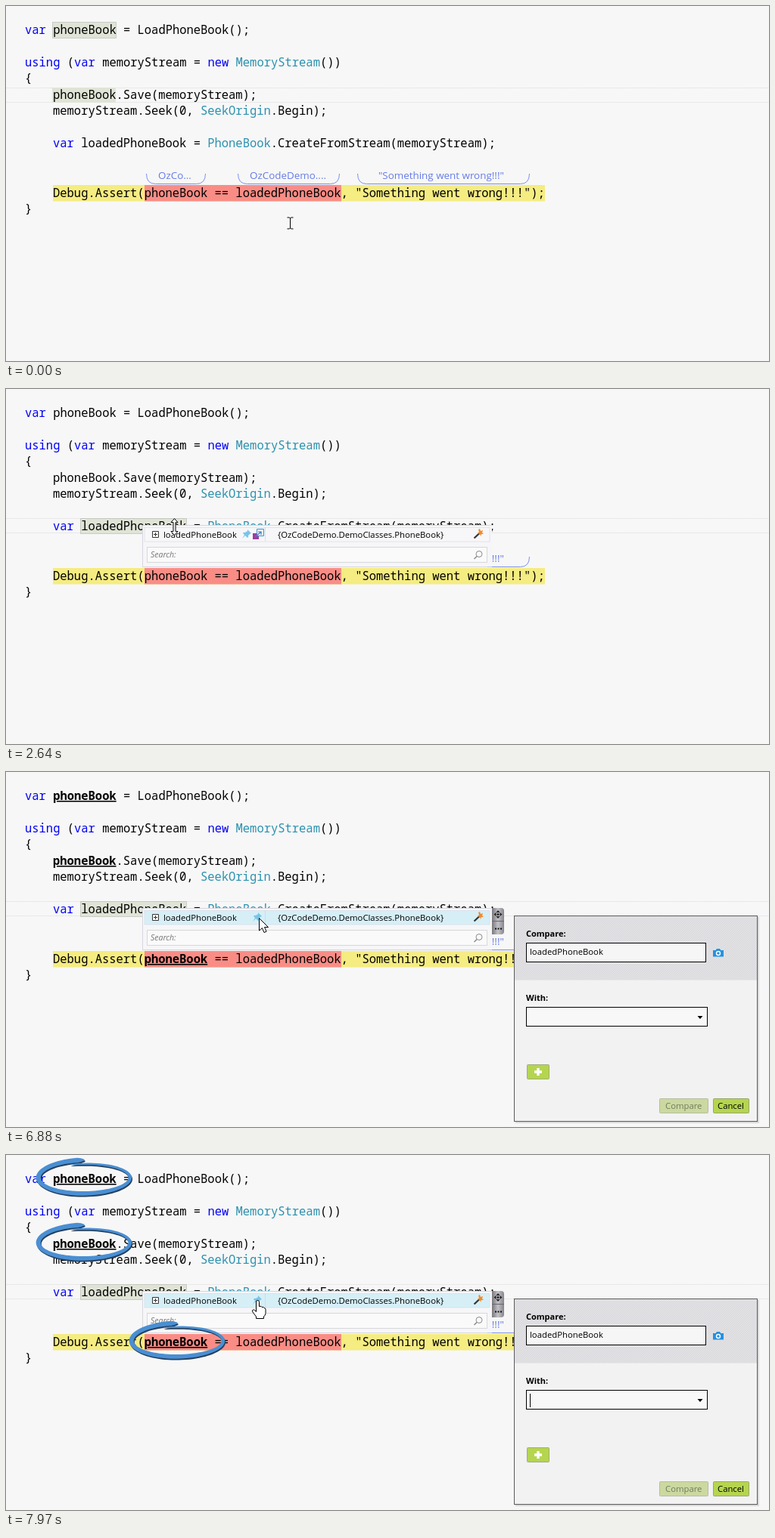
Animation, 1008 px wide and 470 px high, one loop 8000 ms. Source, as an HTML page:

```html
<!DOCTYPE html>
<html lang="en">
<head>
<meta charset="utf-8">
<title>Compare objects</title>
<style>
html, body { margin: 0; width: 100%; height: 100%; overflow: hidden; background: #f7f7f7; }
svg { display: block; width: 100%; height: 100%; }
text { white-space: pre; font: 11.3px "Open Sans", "Noto Sans", sans-serif; fill: #000; }
#code text { font: 500 15.47px "Noto Sans Mono", "DejaVu Sans Mono", monospace; }
#code .keyword { fill: #0000f5; }
#code .type { fill: #2b91af; }
#code.bold .ref { font-weight: 700; text-decoration: underline; text-decoration-thickness: 2px; }
#values text { font-size: 13.4px; fill: #667ce6; }
#values path { fill: none; stroke: #7a90f0; }
.mark { fill: #dfe4d6; }
.dotted { stroke: #a5aaa0; stroke-dasharray: 1 1; }
.label { font-weight: 700; font-size: 11px; }
</style>
</head>
<body>
<svg viewBox="0 0 1008 470" preserveAspectRatio="none">
  <defs>
    <pattern id="hatch" width="3" height="3" patternUnits="userSpaceOnUse">
      <rect width="3" height="3" fill="#e1e1e4"/>
      <path d="M0 3L3 0" stroke="#d6d6da" stroke-width=".7"/>
    </pattern>
    <linearGradient id="metal">
      <stop offset="0" stop-color="#77777c"/><stop offset=".5" stop-color="#c2c2c8"/><stop offset="1" stop-color="#85858b"/>
    </linearGradient>
  </defs>
  <rect width="1008" height="470" fill="#f7f7f7"/>
  <path id="currentLine" d="M0 .5H1008M0 19.5H1008" stroke="#dadada" stroke-dasharray="1 1"/>
  <g id="oldMarks">
    <rect class="mark dotted" x="61.5" y="21.5" width="84" height="21"/>
    <rect class="mark" x="61" y="108" width="84" height="20"/>
  </g>
  <rect id="newMark" class="mark dotted" x="98.5" y="171.5" width="140" height="20"/>
  <rect x="62" y="237" width="650" height="21.5" fill="#f5ec82"/>
  <rect x="183" y="237" width="260" height="21.5" fill="#f98d86"/>
  <g id="code"></g>
  <path id="textCaret" d="M146.5 171V191" stroke="#000"/>
  <g id="values"></g>

  <g id="popup">
    <rect x="180.5" y="180.5" width="461.5" height="55" fill="#f6f6f9"/>
    <path d="M180.5 236V180.5H641M180.5 235.5H636" fill="none" stroke="#d6d6de"/>
    <rect id="row" x="183" y="183.5" width="456" height="18.5" stroke="#d0d0d8" stroke-dasharray="1 1"/>
    <path d="M342.5 184V202" stroke="#c4c8d0" stroke-dasharray="1 1"/>
    <path d="M193.5 188.5h8v8h-8zM195 192.5h5M197.5 190v5" fill="#fff" stroke="#333"/>
    <text x="208" y="197">loadedPhoneBook</text>
    <text x="359" y="197">{OzCodeDemo.DemoClasses.PhoneBook}</text>
    <path id="pin" d="M1-6L6-1L4 0L2 2Q3 4 1 5L-2 2L-6 6L-3 1L-5-1Q-4-3-2-2L1-4Z" fill="#79c5e8"/>
    <g id="compareIcon">
      <rect x="326" y="191" width="8" height="8" fill="#a23a9e"/>
      <path d="M331.5 185.5h9v9h-9z" fill="#e6f3fb" stroke="#3f94cf"/>
      <path d="M329 196L337 189M333 189h4v4" fill="none" stroke="#3f80bd" stroke-width="1.2"/>
    </g>
    <path d="M618.5 197.5L626 190.5" stroke="#333" stroke-width="2.2"/>
    <path d="M626 185l1 3 3-1-1 3 2 2-3 0-1 3-1-3-3-1 2-2-1-3z" fill="#f28a2c"/>
    <rect x="186.5" y="209.5" width="449" height="20" fill="#fafafa" stroke="#b8b8b8" stroke-dasharray="1 1"/>
    <text x="191" y="223" style="font-style:italic;font-size:10.5px;fill:#777">Search:</text>
    <g fill="none" stroke="#888"><circle cx="625" cy="218.5" r="4"/><path d="M622 221.5L618.5 225" stroke-width="1.5"/></g>
  </g>
  <g id="tools">
    <path d="M642 180h12q4 0 4 4v27q0 4-4 4h-12z" fill="url(#metal)"/>
    <path d="M642 197.5h16" stroke="#66666b"/>
    <path d="M650 183l2.500 3h-5zM650 194l2.500-3h-5zM644.5 188.5l3-2.500v5zM655.5 188.5l-3-2.500v5z" fill="#222"/>
    <circle cx="650" cy="188.5" r="1.5" fill="#222"/>
    <path d="M646 207.5h2M649.5 207.5h2M653 207.5h2" stroke="#111" stroke-width="2"/>
  </g>

  <g id="dialog">
    <rect x="673" y="192" width="322" height="273" fill="#000" opacity=".12"/>
    <rect x="671.5" y="190.5" width="321" height="272" fill="#f2f2f2" stroke="#5c5c5c"/>
    <rect x="672" y="191" width="320" height="84.5" fill="url(#hatch)"/>
    <text class="label" x="687" y="218">Compare:</text>
    <rect x="687.5" y="226.5" width="237" height="25" fill="#f6f6f6" stroke="#000"/>
    <text x="692" y="242">loadedPhoneBook</text>
    <path d="M934 236h3.500l1.500-2h4l1.500 2h3.500v8.500h-14z" fill="#2492df"/>
    <circle cx="941" cy="240" r="2.5" fill="#2492df" stroke="#fff" stroke-width="1.4"/>
    <text class="label" x="687" y="303">With:</text>
    <rect x="687.5" y="311.5" width="239" height="25" fill="#f8f8f8" stroke="#000"/>
    <path d="M913.5 323h7l-3.500 4z"/>
    <path id="boxCaret" d="M692.5 316V334" stroke="#000"/>
    <rect x="688.5" y="387.5" width="29" height="19" rx="1" fill="#b5d54f" stroke="#a0ae79"/>
    <path d="M703 392v10M698 397h10" stroke="#fff" stroke-width="3.4"/>
    <rect x="863.5" y="432.5" width="64" height="19" rx="1" fill="#cbd9a0" stroke="#b7bda6"/>
    <text x="871" y="446" style="fill:#737a5e">Compare</text>
    <rect x="934.5" y="432.5" width="47" height="19" rx="1" fill="#b5d54f" stroke="#98a771"/>
    <text x="940" y="446">Cancel</text>
  </g>
  <g id="rings"></g>
  <g id="cursor" stroke-linejoin="round">
    <path data-kind="beam" d="M-4-7.500H-1L0-6.500L1-7.500H4M0-6.500V6.500M-4 7.500H-1L0 6.500L1 7.500H4" fill="none" stroke="#000"/>
    <path data-kind="resize" d="M0-11L4.500-6H1.500V6H4.500L0 11L-4.500 6H-1.500V-6H-4.500Z" fill="#fff" stroke="#000"/>
    <path data-kind="arrow" d="M0 0V16.500L4 13L6.500 19L9.500 17.700L7 12H12Z" fill="#fff" stroke="#000"/>
    <path data-kind="hand" d="M-2 1.500Q-2 0 0 0Q2 0 2 2V8Q5 7 5.500 9Q8 8 8.500 10Q10.500 10 10.500 12V17Q10 20 8 21.500V24H-2V21.500L-6.500 15.500Q-8 13-6 12.300Q-4 12-2 15Z" fill="#fff" stroke="#000"/>
  </g>
</svg>
<script>
const LOOP = 8000;
const $ = id => document.getElementById(id);

const codeLines = [
  [25, 37, 'var phoneBook = LoadPhoneBook();'],
  [25, 80, 'using (var memoryStream = new MemoryStream())'],
  [25, 101, '{'],
  [62, 123, 'phoneBook.Save(memoryStream);'],
  [62, 144, 'memoryStream.Seek(0, SeekOrigin.Begin);'],
  [62, 187, 'var loadedPhoneBook = PhoneBook.CreateFromStream(memoryStream);'],
  [62, 253, 'Debug.Assert(phoneBook == loadedPhoneBook, "Something went wrong!!!");'],
  [25, 274, '}']
];
const colour = line => line.replace(/\b(?:(var|using|new)|(MemoryStream|SeekOrigin|PhoneBook)|phoneBook)\b/g,
  (word, keyword, type) => `<tspan class="${keyword ? 'keyword' : type ? 'type' : 'ref'}">${word}</tspan>`);
$('code').innerHTML = codeLines.map(([x, y, s]) => `<text x="${x}" y="${y}">${colour(s)}</text>`).join('');

const values = [
  [185.5, 263.5, 201, 'OzCo...'],
  [306.5, 440.5, 322, 'OzCodeDemo....'],
  [464.5, 691.5, 492, '"Something went wrong!!!"']
];
$('values').innerHTML = values.map(([left, right, x, s]) =>
  `<path d="M${left} 222Q${left} 235.5 ${left + 12} 235.5H${right - 12}Q${right} 235.5 ${right} 222"/>
   <text x="${x}" y="229">${s}</text>`).join('');

// Brush rings: centre and start time
const rings = [[103.5, 30, 7310], [103.5, 116, 7310], [226.5, 246, 7340]];
$('rings').innerHTML = rings.map(([x, y]) => `<g transform="translate(${x} ${y})">
  <path fill="#24405f" transform="translate(1 1.8)"/><path fill="#4a8fd3"/></g>`).join('');
const ringPaths = [...$('rings').children].map(g => [...g.children]);

// A stroke that starts at the top, runs counterclockwise and thins as it spirals inwards
function brush(progress) {
  if (progress <= 0) return '';
  const outer = [], inner = [], steps = Math.max(8, Math.ceil(progress * 90));
  for (let i = 0; i <= steps; i++) {
    const u = progress * i / steps;
    const angle = -Math.PI / 2 - u * Math.PI * 2.1;
    const tip = Math.min(1, u * 45 + .25, (progress - u) * 45 + .25);
    const half = (3.1 - 2.3 * u ** 3) * tip;
    const point = d => `${((61 - u + d) * Math.cos(angle)).toFixed(2)} ${((23.5 - 5.5 * u + d) * Math.sin(angle)).toFixed(2)}`;
    outer.push(point(half));
    inner.unshift(point(-half));
  }
  return `M${outer.concat(inner).join('L')}Z`;
}

// time, x, y
const track = [
  [0, 375, 287], [810, 165, 161], [840, 165, 161], [1290, 147, 177], [2460, 147, 177],
  [2640, 222, 182], [3210, 334, 193], [7340, 334, 193], [7600, 332, 192]
];
const shapes = [[0, 'beam'], [2610, 'resize'], [2670, 'arrow'], [3030, 'hand'], [6690, 'arrow'], [7600, 'hand']];
const cursorShapes = [...$('cursor').children];
const clamp = v => Math.min(1, Math.max(0, v));
const smooth = v => v * v * (3 - 2 * v);

function cursorAt(t) {
  const i = track.findIndex(k => k[0] > t);
  if (i < 0) return track.at(-1).slice(1);
  const [t0, x0, y0] = track[i - 1], [t1, x1, y1] = track[i];
  const u = smooth((t - t0) / (t1 - t0));
  return [x0 + (x1 - x0) * u, y0 + (y1 - y0) * u];
}

const show = (id, on) => $(id).style.display = on ? '' : 'none';

function draw(t) {
  const clicked = t >= 1650, comparing = t >= 6690, hovered = t >= 2670;
  $('currentLine').setAttribute('transform', `translate(0 ${clicked ? 171 : 108})`);
  show('oldMarks', !clicked);
  show('textCaret', clicked && t < 2160);
  show('newMark', t >= 2160);
  show('popup', t >= 2580);
  show('tools', hovered);
  $('row').setAttribute('fill', hovered ? '#d6eff7' : '#f7f7f9');
  show('compareIcon', !comparing);
  $('pin').setAttribute('transform', `translate(${comparing ? 332 : 318} 192)`);
  $('code').classList.toggle('bold', t >= 6640);
  show('dialog', comparing);
  $('dialog').style.opacity = clamp((t - 6640) / 200);
  show('boxCaret', t >= 6900 && (t < 7430 || t >= 7960));

  rings.forEach(([, , start], i) => {
    const d = brush(clamp((t - start) / (7970 - start)));
    ringPaths[i].forEach(p => p.setAttribute('d', d));
  });

  const [x, y] = cursorAt(t).map(Math.round);
  $('cursor').setAttribute('transform', `translate(${x + .5} ${y + .5})`);
  const kind = shapes.findLast(s => s[0] <= t)[1];
  cursorShapes.forEach(s => s.style.display = s.dataset.kind === kind ? '' : 'none');
}

const begin = performance.now();
function tick() {
  draw((performance.now() - begin) % LOOP);
  requestAnimationFrame(tick);
}
tick();
</script>
</body>
</html>
```
